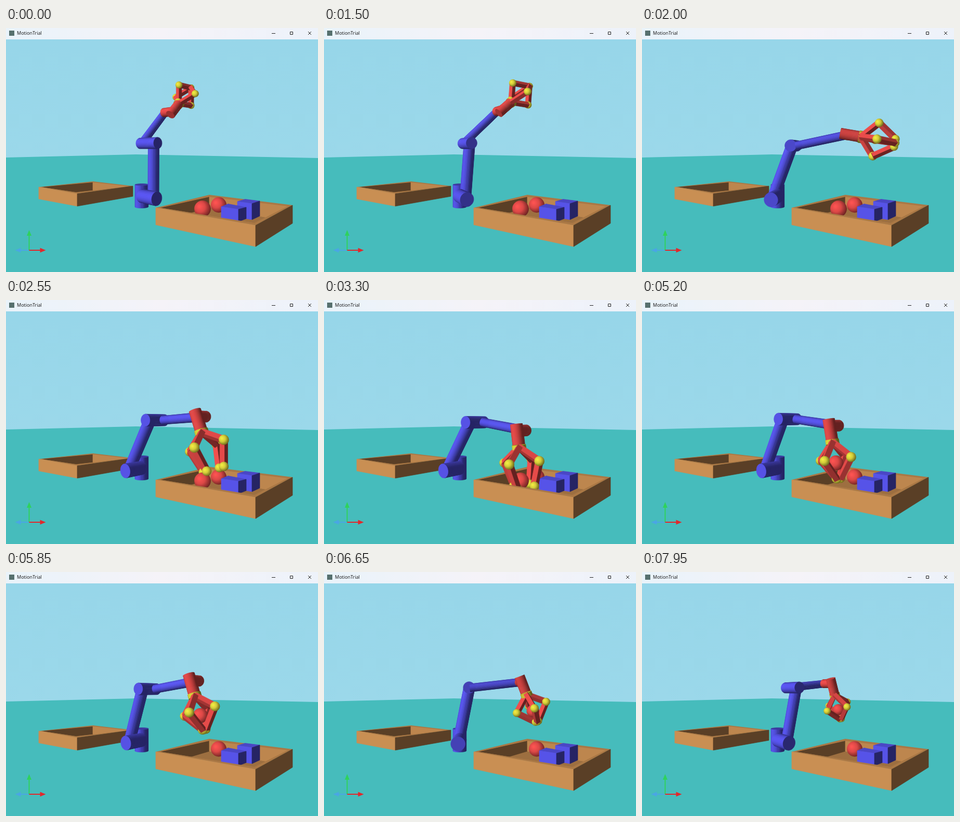
Write an HTML page with a canvas that moves like this. It is 600 by 471 pixels and loops after 8000 ms.

```html
<!DOCTYPE html>
<html lang="en">
<head>
<meta charset="utf-8">
<title>Robot arm</title>
<style>
html, body { margin: 0; width: 100%; height: 100%; overflow: hidden; background: #46bcbc; }
canvas { display: block; }
</style>
</head>
<body>
<canvas id="stage" width="600" height="471"></canvas>
<script>
const ctx = document.getElementById('stage').getContext('2d');
const LOOP = 8000, STEP = 50;
const FOCAL = 542, EYE = 2.085, HORIZON = 232;
const BLUE = [90, 86, 240], RED = [238, 78, 76], YELLOW = [228, 222, 62];
const LIGHT = unit([-0.72, 0.4, -0.55]);
const RAD = Math.PI / 180;

// time, yaw, elbow reach + height, wrist reach + height, hand pitch, finger spread, finger bend
const KEYS = [
  [1250, 43.8, 0.01, 2.258, 1.157, 3.46, 45, 45, 45],
  [1500, 21.8, 0.149, 2.256, 1.476, 3.472, 50, 45, 45],
  [2100, -18, 0.75, 2.15, 2.5, 2.4, 112, 50, 33],
  [2550, -40, 0.963, 2.085, 2.585, 2.19, 160, 55, 20],
  [2900, -40, 0.98, 2.075, 2.6, 2.12, 163, 55, 20],
  [3750, -40, 1.117, 1.957, 2.724, 1.456, 180, 54, 20],
  [4250, -40, 1.117, 1.957, 2.724, 1.456, 180, 47, 42],
  [4600, -40, 1.117, 1.957, 2.724, 1.456, 180, 47, 41],
  [5200, -40, 0.829, 2.118, 2.48, 1.921, 169, 47, 39],
  [5850, -38, 0.6, 2.19, 2.3, 2.43, 162, 48, 41],
  [6350, -21, 0.44, 2.22, 2.2, 2.45, 160, 49, 42],
  [6650, 0, 0.365, 2.237, 2.134, 2.439, 159, 49, 43],
  [7200, 20, 0.375, 2.24, 2.13, 2.43, 161, 49, 43],
  [7950, 32.8, 0.383, 2.243, 2.125, 2.424, 162, 49, 43]
];

function add(p, q, k = 1) { return p.map((v, i) => v + q[i] * k); }
function dot(p, q) { return p[0] * q[0] + p[1] * q[1] + p[2] * q[2]; }
function unit(p) { const n = Math.hypot(...p); return p.map(v => v / n); }
function cross(p, q) {
  return [p[1] * q[2] - p[2] * q[1], p[2] * q[0] - p[0] * q[2], p[0] * q[1] - p[1] * q[0]];
}
function mid(p, q) { return p.map((v, i) => (v + q[i]) / 2); }
function project(p) {
  const k = FOCAL / p[2];
  return [300 + p[0] * k, HORIZON - (p[1] - EYE) * k];
}
function tone(rgb, k) { return `rgb(${rgb.map(v => Math.min(255, Math.round(v * k)))})`; }
function lit(rgb, normal) { return tone(rgb, 0.42 + 0.6 * Math.max(0, dot(normal, LIGHT))); }

// Monotone cubic interpolation through the key poses
function slope(i, c) {
  if (i === 0 || i === KEYS.length - 1) return 0;
  const [a, b, d] = [KEYS[i - 1], KEYS[i], KEYS[i + 1]];
  const s = (b[c] - a[c]) / (b[0] - a[0]), r = (d[c] - b[c]) / (d[0] - b[0]);
  return s * r > 0 ? 2 * s * r / (s + r) : 0;
}
function poseAt(t) {
  const last = KEYS.length - 1;
  if (t <= KEYS[0][0]) return KEYS[0].slice(1);
  if (t >= KEYS[last][0]) return KEYS[last].slice(1);
  let i = 0;
  while (t >= KEYS[i + 1][0]) i++;
  const a = KEYS[i], b = KEYS[i + 1], w = b[0] - a[0], x = (t - a[0]) / w;
  const out = [];
  for (let c = 1; c < a.length; c++) {
    // the first move starts at full speed
    const m = i === 0 ? (b[c] - a[c]) / w : slope(i, c);
    const n = slope(i + 1, c);
    out.push(a[c] * (1 + 2 * x) * (1 - x) ** 2 + b[c] * x * x * (3 - 2 * x)
      + w * (m * x * (1 - x) ** 2 - n * x * x * (1 - x)));
  }
  return out;
}

function poly(points, fill, edge) {
  ctx.beginPath();
  points.forEach(p => ctx.lineTo(p[0], p[1]));
  ctx.closePath();
  ctx.fillStyle = fill;
  ctx.fill();
  if (edge) {
    ctx.strokeStyle = fill;
    ctx.lineWidth = 0.7;
    ctx.stroke();
  }
}
function rod(p, q, radius, rgb, sides = 28) {
  const axis = unit(add(q, p, -1));
  const e1 = unit(cross(axis, Math.abs(axis[1]) > 0.9 ? [1, 0, 0] : [0, 1, 0]));
  const e2 = cross(axis, e1);
  const around = k => {
    const a = k * 2 * Math.PI / sides;
    return add(e1.map(v => v * Math.cos(a)), e2, Math.sin(a));
  };
  const faces = (n, at) => dot(n, add(at, [0, EYE, 0], -1)) < 0;
  const lower = [], upper = [];
  for (let k = 0; k < sides; k++) {
    lower.push(project(add(p, around(k), radius)));
    upper.push(project(add(q, around(k), radius)));
  }
  for (let k = 0; k < sides; k++) {
    const n = around(k + 0.5), j = (k + 1) % sides;
    if (faces(n, add(mid(p, q), n, radius * Math.cos(Math.PI / sides)))) {
      poly([lower[k], lower[j], upper[j], upper[k]], lit(rgb, n), true);
    }
  }
  const back = axis.map(v => -v);
  if (faces(axis, q)) poly(upper, lit(rgb, axis), true);
  if (faces(back, p)) poly(lower, lit(rgb, back), true);
}
function disc(x, y, r, rgb) {
  const g = ctx.createRadialGradient(x - r * 0.4, y - r * 0.3, r * 0.1, x - r * 0.2, y - r * 0.15, r * 1.25);
  g.addColorStop(0, tone(rgb, 1.06));
  g.addColorStop(0.45, tone(rgb, 0.92));
  g.addColorStop(1, tone(rgb, 0.44));
  ctx.fillStyle = g;
  ctx.beginPath();
  ctx.arc(x, y, r, 0, 7);
  ctx.fill();
}
function ball(p, r, rgb) {
  const [x, y] = project(p);
  disc(x, y, r * FOCAL / p[2], rgb);
}

function drawWindow() {
  const bar = ctx.createLinearGradient(0, 0, 600, 0);
  bar.addColorStop(0, '#e9f3fa');
  bar.addColorStop(0.5, '#f5f3f8');
  bar.addColorStop(1, '#edf2fa');
  ctx.fillStyle = bar;
  ctx.fillRect(0, 0, 600, 22);
  ctx.fillStyle = '#56706e';
  ctx.fillRect(6, 5, 10, 10);
  ctx.fillStyle = '#111';
  ctx.font = '9px "Open Sans", "Noto Sans", sans-serif';
  ctx.fillText('MotionTrial', 21, 13);
  ctx.strokeStyle = '#222';
  ctx.lineWidth = 1;
  ctx.beginPath();
  ctx.moveTo(511, 10.5); ctx.lineTo(518, 10.5);
  ctx.rect(546.5, 7.5, 5, 5);
  ctx.moveTo(581, 7); ctx.lineTo(587, 13);
  ctx.moveTo(587, 7); ctx.lineTo(581, 13);
  ctx.stroke();
}
function drawBackdrop() {
  const sky = ctx.createLinearGradient(0, 22, 0, 250);
  sky.addColorStop(0, '#97d6e9');
  sky.addColorStop(1, '#9bd8ea');
  ctx.fillStyle = sky;
  ctx.fillRect(0, 22, 600, 232);
  poly([[0, 250], [250, 244], [600, 251], [600, 471], [0, 471]], '#46bcbc');
}

const WOOD = '#c98f53', DARK = '#5a3f26', RIM = '#aa7845';
// corners run left, back, right, front
const TRAYS = [
  { out: [[63, 307], [167, 296], [244, 305], [137, 320]], inn: [[68, 307], [167, 298], [238, 305.5], [137, 317.5]],
    drop: [23, 15, 20, 24] },
  { out: [[288, 347], [391, 322], [551, 342], [480, 381]], inn: [[297, 347], [391, 326], [542, 344], [478, 376.5]],
    drop: [33, 20, 35, 41] }
];
function wall(p, q, hp, hq, fill) {
  poly([p, q, [q[0], q[1] + hq], [p[0], p[1] + hp]], fill, true);
}
function trayBack({ out, inn, drop }) {
  poly(out, RIM);
  ctx.save();
  ctx.beginPath();
  inn.forEach(p => ctx.lineTo(p[0], p[1]));
  ctx.clip();
  poly(inn, '#9d6f40');
  wall(inn[0], inn[1], drop[0] - 6, drop[1], DARK);
  wall(inn[1], inn[2], drop[1], drop[2] - 6, '#bd864e');
  ctx.restore();
}
function trayFront({ out, inn, drop }) {
  poly([out[0], out[3], inn[3], inn[0]], RIM);
  poly([out[3], out[2], inn[2], inn[3]], RIM);
  wall(out[0], out[3], drop[0], drop[3], WOOD);
  wall(out[3], out[2], drop[3], drop[2], DARK);
}
function cube(left, back, right, front, h) {
  poly([left, back, right, front], '#4a47c6', true);
  wall(left, front, h - 1, h, '#5653e8');
  wall(front, right, h, h - 2, '#262464');
}
function drawAxes() {
  const arrow = (dx, dy, len, color) => {
    const at = (along, side) => [44.5 + dx * along - dy * side, 429 + dy * along + dx * side];
    poly([at(0, -1), at(len - 9, -1), at(len - 9, 1), at(0, 1)], color);
    poly([at(len - 11, -4.5), at(len, 0), at(len - 11, 4.5)], color);
  };
  arrow(-1, 0, 27, '#4aa6e4');
  arrow(0, -1, 39, '#2fd25c');
  arrow(1, 0, 32, '#e2282c');
}

function drawArm(t) {
  const [yaw, re, ye, rw, yw, pitch, spread, bend] = poseAt(t);
  const s = Math.sin(yaw * RAD), c = Math.cos(yaw * RAD);
  const at = (reach, side, y) => [-0.72 + reach * c + side * s, y, 10 + reach * s - side * c];
  const out = [c, 0, s], side = [s, 0, -c];
  const tilt = pitch * RAD;
  const aim = add(out.map(v => v * Math.sin(tilt)), [0, 1, 0], Math.cos(tilt));
  const across = add(out.map(v => -v * Math.cos(tilt)), [0, 1, 0], Math.sin(tilt));
  const wrist = at(rw, 0.42, yw), palm = add(wrist, aim, 0.47);

  rod([-0.72, 0, 10], [-0.72, 0.79, 10], 0.235, BLUE);
  rod(at(0, 0.62, 0.388), at(re, 0.62, ye), 0.185, BLUE);
  rod(at(0, 0, 0.388), at(0, 0.79, 0.388), 0.235, BLUE);
  const elbow = () => rod(at(re, -0.1, ye), at(re, 0.83, ye), 0.19, BLUE);
  const forearm = () => rod(at(re, 0, ye), at(rw, 0, yw), 0.14, BLUE);
  if (yaw > 0) { forearm(); elbow(); } else { elbow(); forearm(); }
  rod(at(rw, -0.08, yw), wrist, 0.165, RED);

  const parts = [];
  const put = (p, draw, bias = 0) => parts.push({ depth: p[2] + bias, draw });
  put(wrist, () => rod(add(wrist, aim, -0.19), add(wrist, aim, 0.44), 0.17, RED));
  put(palm, () => rod(add(wrist, aim, 0.4), add(wrist, aim, 0.53), 0.19, YELLOW), -0.03);

  const a = spread * RAD, b = bend * RAD, len = 0.71;
  for (const [dir, sign] of [[side, 1], [side, -1], [across, 1], [across, -1]]) {
    const knuckle = add(add(palm, aim, len * Math.cos(a)), dir, sign * len * Math.sin(a));
    const tip = add(add(knuckle, aim, len * Math.cos(b)), dir, -sign * len * Math.sin(b));
    put(mid(palm, knuckle), () => rod(palm, knuckle, 0.105, RED, 4));
    put(mid(knuckle, tip), () => rod(knuckle, tip, 0.105, RED, 4));
    put(knuckle, () => ball(knuckle, 0.137, YELLOW), -0.06);
    put(tip, () => ball(tip, 0.127, YELLOW), -0.06);
  }

  const rest = [1.122, 0.401, 7.8], held = add(palm, aim, 0.6);
  const grip = Math.min(1, Math.max(0, (t - 3950) / 350));
  const load = add(rest, add(held, rest, -1), grip);
  put(load, () => ball(load, 0.23 - 0.015 * grip, RED));
  parts.sort((p, q) => q.depth - p.depth).forEach(p => p.draw());
}

function render(t) {
  drawBackdrop();
  trayBack(TRAYS[0]);
  trayFront(TRAYS[0]);
  trayBack(TRAYS[1]);
  disc(409, 341.5, 15, RED);
  cube([445, 335], [460, 330.5], [488, 334], [473, 339], 31);
  cube([414, 345], [427, 339.5], [462, 346], [447, 350], 24);
  drawArm(t);
  trayFront(TRAYS[1]);
  drawAxes();
  drawWindow();
}

const start = performance.now();
function frame() {
  const t = (performance.now() - start) % LOOP;
  render(Math.floor(t / STEP) * STEP);
  requestAnimationFrame(frame);
}
frame();
</script>
</body>
</html>
```
